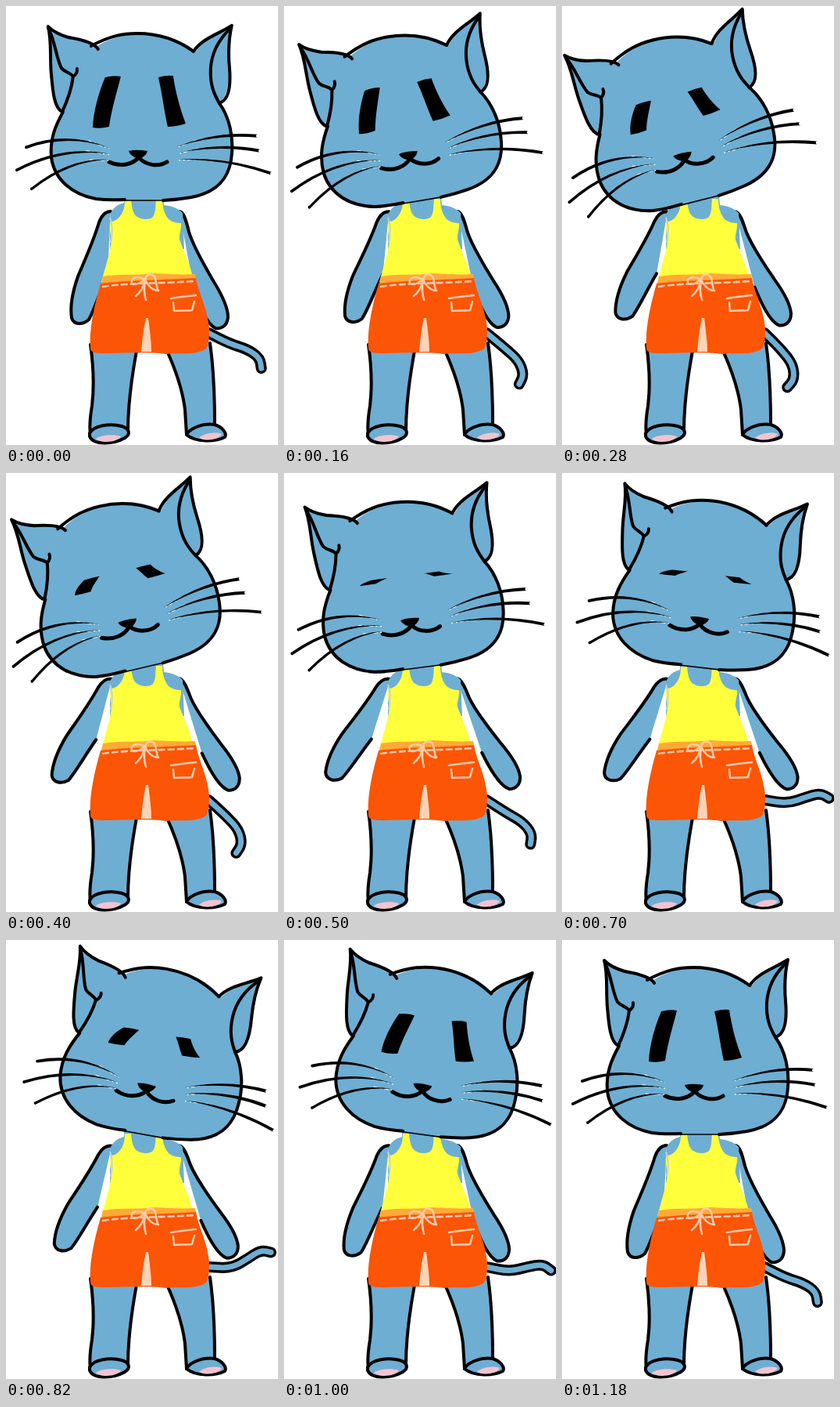
Animation of 348 by 560 pixels, one loop 1200 ms. Source, as an HTML page:

```html
<!DOCTYPE html>
<html lang="en">
<head>
<meta charset="utf-8">
<title>Swaying cat</title>
<style>
  html, body { margin: 0; width: 100%; height: 100%; overflow: hidden; background: #fff; }
  svg { display: block; width: 100vw; height: 100vh; }
  .blue { fill: #6eaed2; }
  .ink { fill: none; stroke: #000; stroke-width: 4; stroke-linecap: round; stroke-linejoin: round; }
  .blue.ink { fill: #6eaed2; }
  .chalk { fill: none; stroke: #ffcaa8; stroke-width: 2.6; stroke-linecap: round; stroke-linejoin: round; }
  .pink { fill: #f3c3d0; }
  .tail { fill: none; stroke-linecap: round; stroke-linejoin: round; }
  .halo { fill: none; stroke: #fff; stroke-width: 1.3; stroke-dasharray: 5 3 2 4; }
</style>
</head>
<body>
<svg viewBox="0 0 348 560">
  <path class="tail" stroke="#000" stroke-width="14"/>
  <path class="tail" stroke="#6eaed2" stroke-width="7"/>

  <g id="legs">
    <path class="blue" d="M108 432C112 460 113 485 110 510Q106 534 108 547L152 551L156 542C156 515 160 478 167 440Z"/>
    <path class="ink" d="M108 432C112 460 113 485 110 510Q106 534 108 547M156 542C156 515 160 478 167 440"/>
    <path class="blue ink" d="M107 545C112 535 133 532 148 536C158 539 160 546 152 551C138 559 112 561 107 549Z"/>
    <path class="pink" d="M115 552C121 547 139 546 147 549C144 556 122 559 115 552Z"/>
    <path class="blue" d="M206 440C216 462 226 490 229 515L231 547L280 550L267 533C267 500 266 465 261 430Z"/>
    <path class="ink" d="M206 440C216 462 226 490 229 515L231 547M261 430C266 465 267 500 267 533"/>
    <path class="blue ink" d="M231 546C238 537 254 532 267 534C277 537 283 545 280 550C268 556 243 557 231 547Z"/>
    <path class="pink" d="M247 551C253 545 267 543 276 546C273 553 256 556 247 551Z"/>
  </g>

  <path id="armL" class="blue ink" d="M134 262C126 262 122 268 119 276C112 300 99 328 92 345C85 365 82 385 84 398C87 407 98 407 106 400C112 390 119 368 130 342"/>
  <path id="armR" class="blue ink" d="M222 262C228 263 231 276 234 288C240 308 255 333 266 352C276 368 284 385 284 397C283 408 276 412 268 411C258 406 248 385 240 360"/>

  <g id="clothes">
    <path class="blue" d="M133 290L134 264C138 256 144 253 151 251L151 243L201 243L202 254C213 255 222 259 226 264L228 310L133 310Z"/>
    <path fill="#ffff3c" d="M152 247L160 247C161 259 163 266 168 269C174 273 184 273 188 269C192 263 191 255 192 246L200 246C200 258 203 266 208 272C213 276 219 277 224 277C225 284 221 291 222 298C228 315 236 330 240 350L122 352C128 330 134 312 135 298C134 290 131 281 134 275C139 275 143 272 146 268C151 262 152 255 152 247Z"/>
    <path fill="none" stroke="#c5d0d8" stroke-width="2" d="M133 270C137 280 136 292 134 302"/>
    <path fill="#ffaa36" d="M124 345C150 341 172 344 190 341C210 342 226 343 242 342L244 352L121 358Z"/>
    <path fill="#fc5506" d="M121 354C150 350 190 350 243 347C246 366 258 385 260 412C260 425 259 435 255 438C240 446 225 442 205 444C180 441 152 443 130 443C118 443 110 443 108 438C106 415 112 385 121 354Z"/>
    <path class="chalk" stroke-dasharray="7 5" d="M124 358C155 353 200 354 242 351"/>
    <path class="chalk" d="M178 349C167 343 159 347 161 354C166 357 172 353 178 349C180 340 187 342 190 345C193 351 192 360 195 363C187 363 181 356 178 349C176 360 171 366 166 370M178 350C176 360 177 368 179 375"/>
    <path class="chalk" d="M211 373C222 371 232 370 243 369M214 378L215 389C224 388 232 389 238 388L241 377"/>
    <path fill="#ffd3b5" d="M179 398L182 398C184 414 186 428 186 441L173 441C174 427 176 411 179 398Z"/>
  </g>

  <g id="head">
    <path class="blue" d="M54 26C70 38 98 40 117 51C150 30 208 27 243 58C256 42 270 35 289 25C284 55 294 108 273 124C286 142 291 167 289 188C287 220 270 238 237 244C210 249 140 249 115 246C85 240 62 222 58 193C56 170 63 153 73 135C62 130 60 110 58 86C56 65 59 45 54 26Z"/>
    <g class="ink">
      <path d="M118 55C113 46 92 42 80 40C70 37 61 33 54 26C59 45 56 65 58 86C60 110 62 130 72 135"/>
      <path d="M56 32C63 46 65 68 71 79C76 85 82 84 86 90Q92 86 91 80M86 90C84 107 78 122 72 135"/>
      <path d="M109 51C133 38 150 35 168 35C200 35 222 45 240 58"/>
      <path d="M240 58C252 41 270 37 289 25C286 38 284 55 286 78C288 100 286 120 273 124"/>
      <path d="M285 31C270 46 263 64 262 80C261 100 266 112 273 124"/>
      <path d="M273 124C286 142 291 167 289 188C287 220 270 238 237 244Q220 247 201 248"/>
      <path d="M152 247Q130 248 115 246C85 240 62 222 58 193C56 170 63 153 73 135"/>
      <path style="stroke-width:1.6" d="M152 248L201 248"/>
      <path style="stroke-width:5" d="M132 199C147 206 162 202 170 193C178 203 195 206 206 199"/>
    </g>
    <g id="eyes">
      <path d="M127 91Q138 88 147 90C143 106 135 132 132 154Q121 157 111 155C112 135 118 112 127 91Z"/>
      <path d="M195 91Q205 88 214 89C217 110 223 132 230 150Q218 154 207 154C202 132 200 112 195 91Z"/>
    </g>
    <path d="M157 185C165 183 173 184 181 185C180 190 175 193 170 196C165 193 159 191 157 185Z"/>
    <g id="whiskers"></g>
  </g>
</svg>
<script>
const LOOP = 1200, SWING = 1180, RAD = Math.PI / 180;
const { sin, cos, min } = Math;
const $ = s => document.querySelector(s);
const head = $('#head'), eyes = $('#eyes'), armL = $('#armL'), armR = $('#armR');
const tails = document.querySelectorAll('.tail');

// Arched sliver from a whisker's tip to its root
function whisker([x, y], rx, ry, lift) {
  const w = 2, mx = (x + rx) / 2, my = (y + ry) / 2 - lift;
  const hx = (mx + rx) / 2, hy = (my + ry) / 2;
  return `<path class="halo" d="M${hx} ${hy + 1}L${rx} ${ry + 1}"/>` +
    `<path d="M${x} ${y - w}Q${mx} ${my - w} ${rx} ${ry}Q${mx} ${my + w} ${x} ${y + w}A${w} ${w} 0 0 1 ${x} ${y - w}Z"/>`;
}
const tipsL = [[26, 180], [14, 209], [33, 233]];
const tipsR = [[322, 166], [325, 185], [340, 214]];
$('#whiskers').innerHTML =
  tipsL.map((tip, i) => whisker(tip, 132, 181 + 7.5 * i, 20)).join('') +
  tipsR.map((tip, i) => whisker(tip, 217 + 2 * i, 180 + 8 * i, 12)).join('');

// Chain of shrinking links that curls towards the tip
function tailPath(bend) {
  let x = 259, y = 417, d = `M${x} ${y}`;
  for (let i = 0; i < 4; i++) {
    const len = 30 - 5.5 * i, rest = 27 - 24 * i + 14 * i * i;
    const a = (rest + bend * min(1, .35 * (i + 1))) * RAD;
    const nx = x + len * cos(a), ny = y + len * sin(a);
    d += `Q${x} ${y} ${(x + nx) / 2} ${(y + ny) / 2}`;
    x = nx; y = ny;
  }
  return d + `L${x} ${y}`;
}

const turn = (el, a, x, y) => el.setAttribute('transform', `rotate(${a} ${x} ${y})`);

function draw(ms) {
  const p = 2 * Math.PI * min(ms % LOOP, SWING) / SWING;
  const swing = (1 - cos(p)) / 2;
  const tilt = -12.3 * sin(p) - 1.9 * sin(p) ** 2 + sin(2 * p) - .6 * swing;
  const bend = 58 * sin(p) - 6 * sin(2 * p) - 15 * swing;
  const open = 1 - .97 * swing;

  turn(head, tilt, 176, 247);
  turn(armL, 15.5 * swing, 131, 270);
  turn(armR, -8.8 * swing, 224, 268);
  eyes.setAttribute('transform', `translate(0 ${133 * (1 - open)}) scale(1 ${open})`);
  const d = tailPath(bend);
  tails.forEach(t => t.setAttribute('d', d));
}

const start = performance.now();
function tick() {
  draw(performance.now() - start);
  requestAnimationFrame(tick);
}
tick();
</script>
</body>
</html>
```
